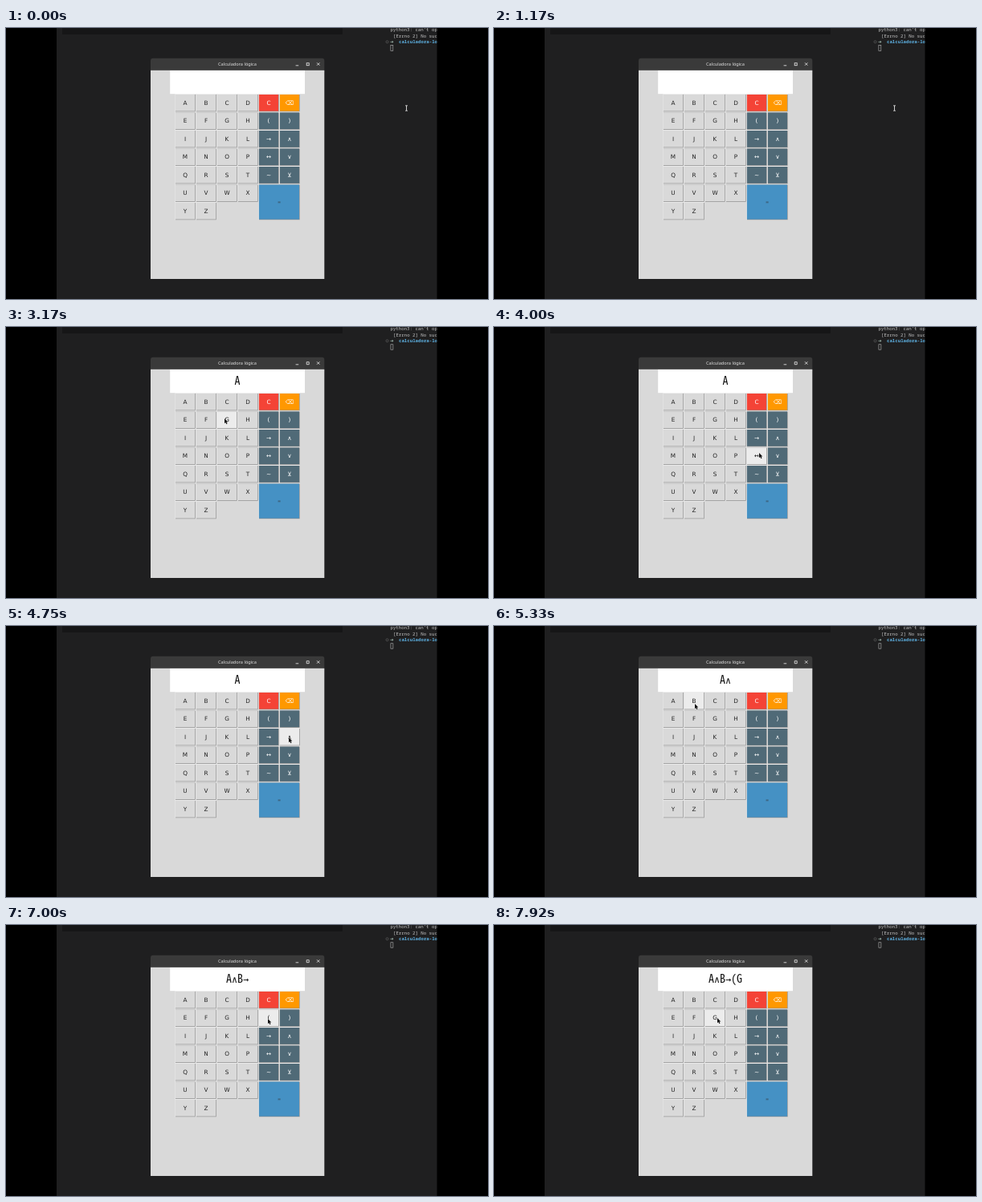
An HTML page with a canvas for the animation above (8 s loop, 600x338 px).

```html
<!DOCTYPE html>
<html lang="es">
<head>
<meta charset="utf-8">
<title>Calculadora lógica</title>
<style>
  html, body { margin: 0; width: 100%; height: 100%; overflow: hidden; background: #000; }
  canvas { display: block; width: 600px; height: 338px; }
</style>
</head>
<body>
<canvas id="stage"></canvas>
<script>
const canvas = document.getElementById('stage');
const ctx = canvas.getContext('2d');
const ratio = window.devicePixelRatio || 1;
canvas.width = 600 * ratio;
canvas.height = 338 * ratio;

const LOOP = 8000;
const STEP = 1000 / 12;
const SANS = '"DejaVu Sans", sans-serif';
const MONO = '"Noto Sans Mono", monospace';
const LEFT = 210, TOP = 82.1, COL = 26, ROW = 22.5;
const OPS = ['C⌫', '()', '→∧', '↔∨', '~⊻'];

// Pointer stops: step, x, y
const path = [
  [0, 498.5, 100], [17, 498.5, 100], [25, 314.2, 112], [30, 225, 97],
  [33, 225, 97], [38, 272, 114], [43, 327, 139], [47, 329, 149],
  [48, 330, 157], [51, 336, 160], [55, 352, 139], [58, 352, 139],
  [64, 250, 97], [69, 250, 97], [72, 314.3, 121], [75, 326, 138],
  [79, 326, 138], [84, 326, 117], [89, 326, 117], [92, 278, 116], [96, 278, 116]
];
const typed = [[31, 'A'], [59, '∧'], [66, 'B'], [77, '→'], [86, '('], [94, 'G']];

const buttons = [];
for (let i = 0; i < 26; i++) {
  addButton(i % 4, Math.floor(i / 4), String.fromCharCode(65 + i), '#d9d9d9', '#222');
}
OPS.forEach((pair, row) => [...pair].forEach((label, i) => {
  const color = row ? '#506a77' : ['#f44336', '#ff9800'][i];
  addButton(4 + i, row, label, color, '#fff');
}));
addButton(4, 5, '=', '#4591c4', '#333', 2);

function addButton(col, row, label, color, ink, span = 1) {
  buttons.push({
    label, color, ink, span,
    x: LEFT + col * COL, y: TOP + row * ROW, w: COL * span, h: ROW * span
  });
}

function rect(x, y, w, h, color) {
  ctx.fillStyle = color;
  ctx.fillRect(x, y, w, h);
}

function text(str, x, y, font, color, align = 'center') {
  ctx.font = font;
  ctx.fillStyle = color;
  ctx.textAlign = align;
  ctx.textBaseline = 'alphabetic';
  ctx.fillText(str, x, y);
}

function line(points, color, width) {
  ctx.beginPath();
  points.forEach(([x, y]) => ctx.lineTo(x, y));
  ctx.strokeStyle = color;
  ctx.lineWidth = width;
  ctx.stroke();
}

// Monotone tangent, so the pointer never overshoots a stop
function tangent(i, axis) {
  const a = path[i - 1], b = path[i], c = path[i + 1];
  if (!a || !c) return 0;
  const m = (b[axis] - a[axis]) / (b[0] - a[0]);
  const n = (c[axis] - b[axis]) / (c[0] - b[0]);
  return m * n > 0 ? 2 * m * n / (m + n) : 0;
}

function pointerAt(step) {
  let i = 0;
  while (i < path.length - 2 && path[i + 1][0] <= step) i++;
  const a = path[i], b = path[i + 1], d = b[0] - a[0];
  const u = (step - a[0]) / d, v = 1 - u;
  return [1, 2].map(k =>
    a[k] * v * v * (1 + 2 * u) + b[k] * u * u * (3 - 2 * u) +
    d * u * v * (tangent(i, k) * v - tangent(i + 1, k) * u));
}

function drawTerminal() {
  const font = '5.73px ' + MONO;
  ctx.save();
  ctx.beginPath();
  ctx.rect(63, 0, 473.5, 338);
  ctx.clip();
  rect(63, 0, 474, 338, '#1f1f20');
  rect(70, 0, 349, 8, '#161617');
  text("python3: can't open file", 478.5, 4.2, font, '#c4c4c4', 'left');
  text('[Errno 2] No such file', 482, 11.8, font, '#c4c4c4', 'left');
  text('➜', 480.3, 19.2, '5.5px ' + SANS, '#9fb8ad');
  text('calculadora-logica', 489, 19.3, 'bold ' + font, '#5fb4e6', 'left');
  ctx.beginPath();
  ctx.arc(474.5, 17.3, 1.5, 0, Math.PI * 2);
  ctx.strokeStyle = '#6a6a6a';
  ctx.lineWidth = 0.6;
  ctx.stroke();
  ctx.strokeStyle = '#b8b8b8';
  ctx.strokeRect(478.9, 21.6, 2.9, 6.7);
  ctx.restore();
}

function drawWindow() {
  ctx.fillStyle = '#3a3a3a';
  ctx.beginPath();
  ctx.roundRect(180, 37.7, 216.3, 20, 3);
  ctx.fill();
  rect(180, 52.8, 216.3, 260.2, '#d9d9d9');
  text('Calculadora lógica', 288, 47.2, '500 5.58px "Noto Sans", sans-serif', '#e2e2e2');
  line([[360.6, 46.8], [364.2, 46.8]], '#ddd', 0.9);
  ctx.strokeStyle = '#ddd';
  ctx.lineWidth = 0.9;
  ctx.strokeRect(374.2, 43.7, 3, 3);
  line([[387, 43.3], [390.4, 46.7]], '#ddd', 0.9);
  line([[390.4, 43.3], [387, 46.7]], '#ddd', 0.9);
  rect(204.2, 53, 167.8, 29.2, '#fff');
}

function drawButton(b, hover) {
  const { x, y, w, h } = b;
  rect(x + 0.3, y + 0.3, w - 0.6, h - 0.6, '#f6f6f6');
  rect(x + 0.9, y + 0.9, w - 1.2, h - 1.2, '#8b8b8b');
  rect(x + 0.9, y + 0.9, w - 1.9, h - 1.9, hover ? '#ececec' : b.color);
  const size = b.span > 1 ? 5 : 7.3;
  text(b.label, x + w / 2, y + h / 2 + size * 0.36, size + 'px ' + SANS, hover ? '#111' : b.ink);
}

function drawEntry(step) {
  const chars = typed.filter(k => k[0] <= step).map(k => k[1]);
  chars.forEach((ch, i) => {
    const font = /[A-Z(]/.test(ch)
      ? '14px "Noto Sans Mono CJK JP", "Noto Sans Mono", monospace'
      : '11.7px "DejaVu Sans Mono", monospace';
    text(ch, 288 + (i - (chars.length - 1) / 2) * 7, 72.3, font, '#111');
  });
}

function drawPointer(x, y) {
  if (x > 396) {
    line([[x, y - 3], [x, y + 3]], '#e4e4e4', 0.9);
    line([[x - 1.5, y - 3.2], [x + 1.5, y - 3.2]], '#e4e4e4', 0.8);
    line([[x - 1.5, y + 3.2], [x + 1.5, y + 3.2]], '#e4e4e4', 0.8);
    return;
  }
  const shape = [[0, 0], [0, 6.2], [1.4, 5], [2.4, 7.3], [3.5, 6.8], [2.5, 4.6], [4.4, 4.5]];
  ctx.beginPath();
  shape.forEach(([dx, dy]) => ctx.lineTo(x + dx, y + dy));
  ctx.closePath();
  ctx.strokeStyle = '#f4f4f4';
  ctx.lineWidth = 1;
  ctx.lineJoin = 'round';
  ctx.stroke();
  ctx.fillStyle = '#111';
  ctx.fill();
}

function draw(time) {
  const step = Math.floor((time % LOOP + 5) / STEP) % 96;
  const [x, y] = pointerAt(step);
  ctx.setTransform(ratio, 0, 0, ratio, 0, 0);
  rect(0, 0, 600, 338, '#000');
  drawTerminal();
  drawWindow();
  for (const b of buttons) {
    drawButton(b, x >= b.x && x < b.x + b.w && y >= b.y && y < b.y + b.h);
  }
  drawEntry(step);
  drawPointer(x, y);
}

let start;
function tick(now) {
  start ??= now;
  draw(now - start);
  requestAnimationFrame(tick);
}
draw(0);
requestAnimationFrame(tick);
</script>
</body>
</html>
```
